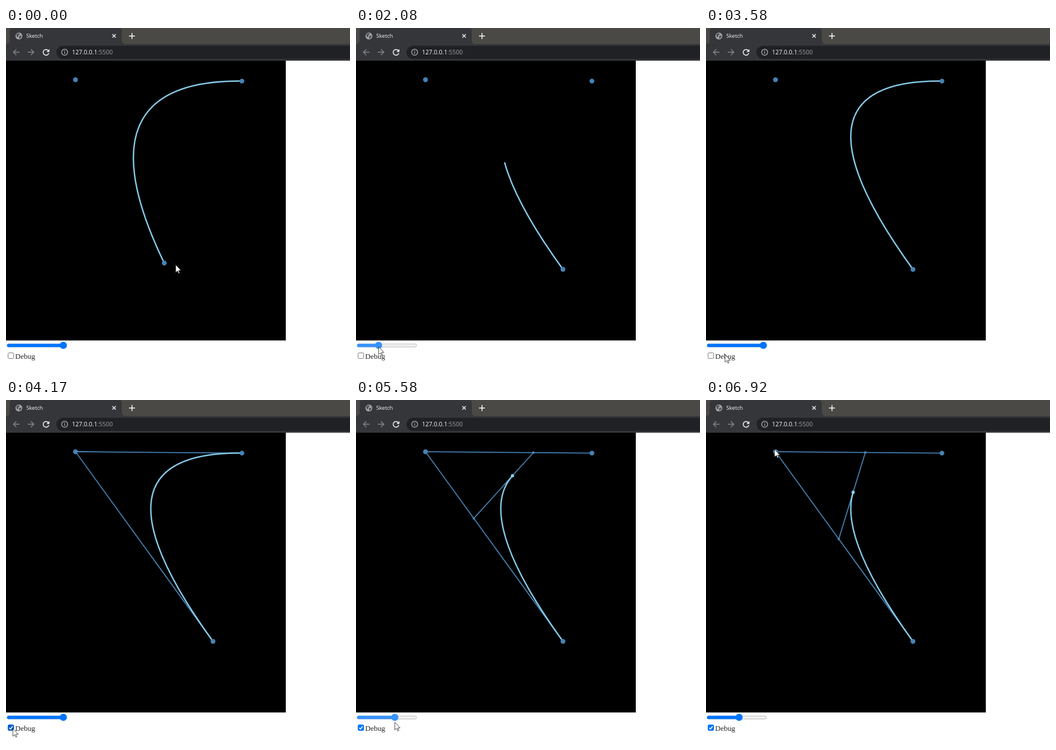
An HTML page that plays this animation: 600 px wide and 600 px high, repeating every 7010 ms.

```html
<!DOCTYPE html>
<html lang="en">
<head>
<meta charset="utf-8">
<title>Sketch</title>
<style>
  html, body { margin: 0; width: 100%; height: 100%; overflow: hidden; background: #fff; }
  svg { display: block; width: 600px; height: 600px; }
  .ui { font-family: "Open Sans", "Noto Sans", sans-serif; font-weight: 500; fill: #f8f9fa; }
  .page { font: 13px "Liberation Serif", "Times New Roman", serif; fill: #222; }
  .icon { fill: none; stroke-width: 1.5; }
  .dot { fill: #4682b4; }
</style>
</head>
<body>
<svg viewBox="0 0 600 600">
  <!-- browser frame -->
  <rect width="600" height="28" fill="#4b4946"/>
  <path d="M0 28Q6.500 28 6.500 21V5Q6.500 0 11 0H197Q202 0 202 5V21Q202 28 208 28Z" fill="#35363a"/>
  <rect y="28" width="600" height="29" fill="#35363a"/>
  <rect x="88" y="31" width="530" height="23" rx="11.500" fill="#202124"/>
  <circle cx="22.500" cy="14" r="6" fill="#a3a5a8"/>
  <path d="M18 11l4-2 2 2-3 2 1 2-3 1zM23 14l4-1-1 4-3 2z" fill="#4a4b4f"/>
  <text class="ui" x="35.300" y="17.200" font-size="9.500">Sketch</text>
  <path class="icon" d="M185.500 10.700l6 6m0-6l-6 6" stroke="#eceded"/>
  <path class="icon" d="M214.500 14h10.400m-5.200-5.200v10.400" stroke="#fff"/>
  <path class="icon" d="M23.500 42.300H13m5-5l-5 5 5 5M38 42.300h10.500m-5-5l5 5-5 5" stroke="#86878b"/>
  <path class="icon" d="M73.700 39.200a5 5 0 1 0 1 4.600" stroke="#f1f3f4"/>
  <path d="M75.600 36.700v5h-5z" fill="#f1f3f4"/>
  <circle class="icon" cx="102.300" cy="42.300" r="5.200" stroke="#9aa0a6"/>
  <path class="icon" d="M102.300 41.500v3.600m0-6v1.300" stroke="#9aa0a6"/>
  <text class="ui" x="115" y="46" font-size="10.500">127.0.0.1<tspan fill="#9aa0a6" font-weight="400">:5500</tspan></text>

  <!-- sketch -->
  <rect y="57" width="488" height="488" fill="#000"/>
  <path id="guides" fill="none" stroke="#4480b2" stroke-width="1.800"/>
  <path id="curve" fill="none" stroke="#85c8e6" stroke-width="2.500"/>
  <circle id="start" class="dot" r="4.200"/>
  <circle id="bend" class="dot" r="4.200"/>
  <circle id="end" class="dot" r="4.200"/>
  <g id="markers">
    <circle id="qa" class="dot" r="2.200"/>
    <circle id="qb" class="dot" r="2.200"/>
    <circle id="tip" r="2.900" fill="#87ceeb"/>
  </g>

  <!-- controls -->
  <rect x="2.100" y="551" width="103.600" height="5.500" rx="2.700" fill="#efefef" stroke="#b2b2b2" stroke-width=".8"/>
  <rect id="fill" x="1.700" y="550.800" height="5.800" rx="2.900"/>
  <circle id="thumb" cy="553.500" r="6.200"/>
  <rect id="box" x="3.600" y="566.600" width="9.800" height="9.800" rx="1.800"/>
  <path id="check" d="M5.600 571.700l2.200 2.300 3.800-5" fill="none" stroke="#fff" stroke-width="1.600"/>
  <text class="page" x="16" y="577">Debug</text>

  <path id="cursor" d="M0 0V13.600L3.100 10.700 5.200 15.200 7 14.400 5 10H9.300Z" fill="#fff" stroke="#222" stroke-width=".8"/>
</svg>
<script>
const LOOP = 7010, STEP = 250 / 3, LAST = 83;
const SLIDER_X = 8.1, SLIDER_W = 91.9;
const BEND = [121.2, 90.2], END = [411.5, 92.6];

// Pointer stops as [step, x, y], joined by straight moves.
const route = [
  [0, 296, 413], [3, 387, 421], [5, 361, 421], [6, 361, 421],   // drag the start point
  [13, 77, 562], [16, 99, 552],                                 // go to the slider
  [25, 39.4, 556], [28, 22.5, 566], [35, 117.5, 555],           // drag down, then up
  [45, 12, 573], [50, 12, 573],                                 // tick the box
  [60, 98, 550], [63, 97, 550],                                 // back to the slider
  [67, 67.7, 562], [71, 82.5, 566], [72, 82.5, 566], [77, 57.7, 558],
  [81, 257, 122], [LAST, 119.5, 86]                             // up to the bend
];
const DROP = 5, CHECKED = 46;
const slides = [[16, 36], [63, 77]];

const $ = id => document.getElementById(id);
const clamp = v => Math.max(0, Math.min(1, v));
const mix = (a, b, t) => a.map((v, i) => v + (b[i] - v) * t);
const set = (id, attrs) => {
  for (const name in attrs) $(id).setAttribute(name, attrs[name]);
};
const place = (id, [cx, cy]) => set(id, { cx, cy });
const show = (id, on) => set(id, { visibility: on ? 'visible' : 'hidden' });
const tint = (hover, active) => active ? '#3793ff' : hover ? '#005cc8' : '#0075ff';

function pointer(k) {
  const i = Math.max(1, route.findIndex(stop => stop[0] >= k));
  const [from, ...a] = route[i - 1], [to, ...b] = route[i];
  return mix(a, b, (k - from) / (to - from));
}

// The dragged point trails the pointer and catches up on release.
function startPoint(k) {
  const [x, y] = pointer(Math.min(k, DROP));
  const lag = clamp(1 - k / DROP);
  return [x - 20 * lag, y - 3 * lag];
}

function sliderValue(k) {
  const slide = slides.findLast(([from]) => from <= k);
  return slide ? clamp((pointer(Math.min(k, slide[1]))[0] - SLIDER_X) / SLIDER_W) : 1;
}

function draw(k) {
  const [mx, my] = pointer(k);
  const over = (x, y, w, h) => mx >= x && mx <= x + w && my >= y && my <= y + h;
  const start = startPoint(k), t = sliderValue(k);
  const qa = mix(start, BEND, t), qb = mix(BEND, END, t), tip = mix(qa, qb, t);
  const debug = k >= CHECKED;

  set('curve', { d: `M${start}Q${qa} ${tip}` });
  set('guides', { d: debug ? `M${start}L${BEND}L${END}M${qa}L${qb}` : '' });
  place('start', start);
  place('qa', qa);
  place('qb', qb);
  place('tip', tip);
  show('markers', debug && t < 1);

  const sliding = slides.some(([from, to]) => k >= from && k < to);
  const fill = tint(over(2, 546, 104, 14), sliding);
  const x = SLIDER_X + SLIDER_W * t;
  set('fill', { width: x - 1.7, fill });
  set('thumb', { cx: x, fill });

  const blue = tint(over(3, 566, 11, 11));
  set('box', debug ? { fill: blue, stroke: blue } : { fill: '#fff', stroke: '#767676' });
  show('check', debug);
  set('cursor', { transform: `translate(${mx} ${my})` });
}

let begin;
function tick(now) {
  begin ??= now;
  // The offset allows for frame times being rounded to 10 ms.
  draw(Math.min(LAST, Math.floor(((now - begin) % LOOP + 3.4) / STEP)));
  requestAnimationFrame(tick);
}
place('bend', BEND);
place('end', END);
draw(0);
requestAnimationFrame(tick);
</script>
</body>
</html>
```
